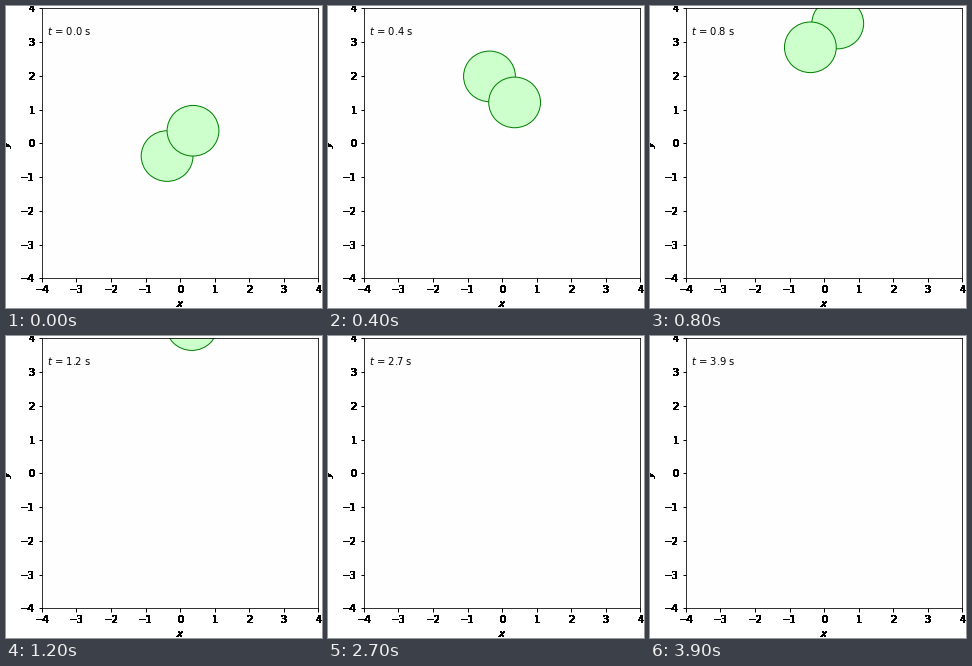
A matplotlib script for the animation above (4000 ms loop, 316 px wide and 302 px high).

```python
import numpy as np
import matplotlib.pyplot as plt
from matplotlib.animation import FuncAnimation
from matplotlib.patches import Circle

W, H, DPI = 316, 302, 72
FRAMES, INTERVAL = 40, 100
SPEED = 4.0          # upward drift of the pair, units/s
OMEGA = -4.0         # rotation of the pair, rad/s
RADIUS = 0.75
ARM = 0.375 * np.sqrt(2)

plt.rcParams.update({
    "font.family": "DejaVu Sans",
    "font.size": 10,
    "axes.linewidth": 0.8,
    "axes.facecolor": "#fefefe",
    "xtick.major.width": 1,
    "ytick.major.width": 1,
})


def harden(image, dpi):
    """Turn every touched pixel of a glyph solid black."""
    out = np.zeros_like(image)
    out[..., 3] = image[..., 3] > 0
    return out, 0, 0


fig = plt.figure(figsize=(W / DPI, H / DPI), dpi=DPI, facecolor="white")
ax = fig.add_axes([35.9 / W, 29.6 / H, 276.3 / W, 270 / H])
ax.set(xlim=(-4, 4), ylim=(-4, 4))
ax.set_xticks(range(-4, 5))
ax.set_yticks(range(-4, 5))
ax.set_xlabel("$x$")
ax.set_ylabel("$y$", labelpad=6)

for axis in (ax.xaxis, ax.yaxis):
    for text in [axis.label, *axis.get_ticklabels()]:
        text.set_agg_filter(harden)

disks = [ax.add_patch(Circle((0, 0), RADIUS, fc="#ccffcc", ec="green", lw=1))
         for _ in range(2)]
clock = ax.text(0.02, 0.9, "", transform=ax.transAxes)


def update(frame):
    t = frame * INTERVAL / 1000
    angle = np.pi / 4 + OMEGA * t
    offset = ARM * np.array([np.cos(angle), np.sin(angle)])
    middle = np.array([0, SPEED * t])
    for disk, side in zip(disks, (-1, 1)):
        disk.center = middle + side * offset
    clock.set_text(f"$t$ = {t:.1f} s")
    return [*disks, clock]


anim = FuncAnimation(fig, update, frames=FRAMES, init_func=lambda: update(0),
                     interval=INTERVAL, repeat=True, repeat_delay=0)
plt.show()
```
